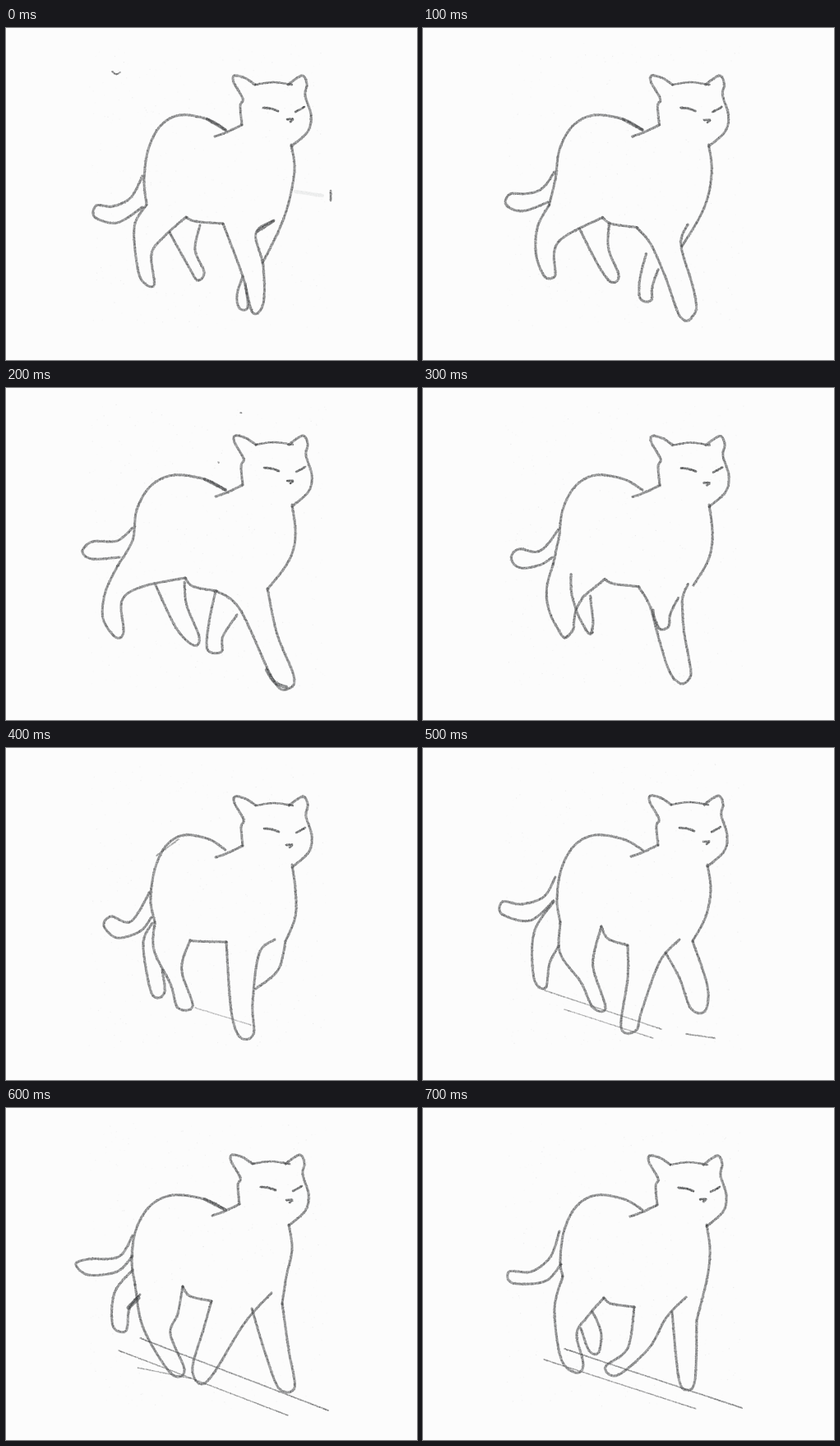
Recreate the animation shown at these times as an HTML page with a canvas. Size 500 by 404 pixels, loop 800 ms.

```html
<!DOCTYPE html>
<html lang="en">
<head>
<meta charset="utf-8">
<title>Walking cat</title>
<style>
html, body { margin: 0; width: 100%; height: 100%; overflow: hidden; background: #fcfcfc; }
canvas { display: block; width: 500px; height: 404px; }
</style>
</head>
<body>
<canvas id="stage" width="500" height="404"></canvas>
<script>
const W = 500, H = 404, STEP = 100;

// Parts that keep their shape and only shift with the pose
const head = {
  earL: "287,118 285,95 288,86 277,66 278,58 291,61 303,69",
  brow: "303,69 325,66 348,69",
  face: "343,69 360,58 366,68 364,82 371,106 367,126 347,144",
  neck: "254,132 268,127 287,118",
  eyeL: "313,97 322,98 331,101",
  eyeR: "352,102 358,99 363,96"
};
const spine = "267,124 245,111 212,106 188,119 173,148 168,185";
const ink = {
  brow: [2.8, 0.8], eyeL: [3.2, 1], eyeR: [3, 1], nose: [3, 1], ridge: [4.3, 0.8]
};

// Limbs run down the outer edge, round the paw and up the inner edge
const plant = {
  shift: [0, 0], rump: 0, nose: "346,112", ridge: 1,
  chest: "344,212 332,246 312,286",
  tail: "166,180 152,206 130,217 110,216 108,230 135,237 166,218",
  hind: "171,215 157,238 157,270 164,305 180,313 177,275 192,254 219,230",
  hind2: "199,249 222,290 233,307 241,297 230,270 236,240",
  fore: "326,234 304,250 313,290 313,335 300,346 288,302 264,238",
  fore2: "291,312 294,340 284,341 281,325 288,302",
  marks: ["4.5 .9|325,235 306,247", "2 .8|129,53 134,56 139,54", "3 .9|395,198 395,210", "5 .1|352,199 385,204"]
};
const reach = {
  shift: [1, 0], rump: -14, nose: "346,114", ridge: 1,
  chest: "350,195 340,217 318,245",
  tail: "154,170 135,186 105,187 93,199 105,208 138,206",
  hind: "136,216 121,248 118,280 133,303 143,297 141,259 165,242 218,231",
  hind2: "182,240 207,292 228,313 235,303 220,265 217,236",
  fore: "318,244 330,300 350,350 345,365 326,357 285,270 256,247",
  fore2: "281,276 264,302 262,321 245,318 247,285 255,247",
  marks: ["5 .85|317,343 327,358 341,364", "1.8 .8|285,30 286,30", "1.8 .7|258,90 259,91"]
};
const gather = {
  shift: [1, 1], rump: 8, nose: "345,119",
  chest: "352,205 340,235",
  tail: "175,175 152,211 128,205 119,216 135,231 163,223 177,206",
  hind: "181,212 180,246 200,287 209,316 227,314 215,277 215,258 224,234",
  hind2: "178,213 167,238 175,292 184,304 193,296 190,270",
  fore: "327,233 308,250 300,310 301,348 285,352 274,320 268,236",
  fore2: "340,235 331,270 304,293",
  marks: ["1.6 .3|230,316 298,337", "2 .5|183,131 210,111"]
};
const swing = {
  shift: [-1, 0], rump: -5, nose: "345,115",
  chest: "344,205 328,235",
  tail: "161,157 147,181 120,190 97,187 96,202 130,210 159,186",
  hind: "167,212 167,250 192,285 207,316 222,316 208,272 208,250 217,217",
  hind2: "159,187 135,225 135,280 149,292 154,262 165,241",
  fore: "312,233 288,260 266,320 259,344 241,340 249,280 249,240",
  fore2: "328,235 346,290 343,320 326,317 312,280 295,249",
  marks: ["1.6 .45|148,295 290,342", "1.4 .4|172,318 280,353", "2 .55|320,348 355,353"]
};
const land = {
  shift: [-3, -1], rump: -15, nose: "345,113", ridge: 1,
  chest: "341,205 336,238",
  tail: "154,155 137,181 100,184 85,190 100,203 135,199 154,180",
  hind: "157,215 165,262 186,303 205,326 217,318 200,275 209,250 215,217",
  hind2: "154,197 132,225 130,265 146,271 150,244 163,227",
  fore: "323,225 290,262 251,325 235,335 227,315 240,270 250,235",
  fore2: "336,238 344,295 351,340 332,341 315,297 299,244",
  marks: ["6 .85|149,243 161,231", "1.8 .6|163,280 392,368", "1.5 .55|137,295 343,374", "1.4 .45|160,316 225,329"]
};
const pass = {
  shift: [-2, 0], rump: -1, nose: "341,112",
  chest: "346,205 333,258",
  tail: "166,150 155,181 132,199 105,199 109,213 148,211 168,190",
  hind: "170,205 160,245 168,305 186,322 195,312 187,275 200,254 220,231",
  hind2: "192,268 202,295 213,298 217,278 213,262 206,248",
  fore: "320,230 296,255 275,292 237,325 222,315 249,292 257,242",
  fore2: "333,258 331,330 321,343 311,328 303,248",
  marks: ["1.8 .6|172,293 388,365", "1.5 .5|147,306 332,366"]
};

const parse = s => s.split(" ").map(p => p.split(",").map(Number));
const mix = (a, b, t) => [a[0] + (b[0] - a[0]) * t, a[1] + (b[1] - a[1]) * t];

// Catmull-Rom curve through the points, in steps of about 0.8 px
function smooth(pts) {
  const out = [], at = i => pts[Math.max(0, Math.min(pts.length - 1, i))];
  for (let i = 0; i < pts.length - 1; i++) {
    const [a, b, c, d] = [at(i - 1), at(i), at(i + 1), at(i + 2)];
    const n = Math.ceil(Math.hypot(c[0] - b[0], c[1] - b[1]) / 0.8);
    for (let k = 0; k < n; k++) {
      const t = k / n;
      out.push([0, 1].map(j => b[j] + 0.5 * t * (c[j] - a[j] +
        t * (2 * a[j] - 5 * b[j] + 4 * c[j] - d[j] +
        t * (3 * (b[j] - c[j]) + d[j] - a[j])))));
    }
  }
  return [...out, pts[pts.length - 1]];
}

function trace(pose) {
  const [dx, dy] = pose.shift, parts = {};
  for (const key in head) parts[key] = parse(head[key]).map(([x, y]) => [x + dx, y + dy]);
  for (const key of ["tail", "hind", "hind2", "fore", "fore2"]) parts[key] = parse(pose[key]);

  const back = parse(spine).map(([x, y]) => [x + pose.rump * Math.min(1, (267 - x) / 95), y]);
  parts.back = [...back, parts.hind[0]];
  if (pose.ridge) parts.ridge = back.slice(0, 2).reverse();
  parts.chest = [[347 + dx, 142], [351 + dx, 172], ...parse(pose.chest)];

  const a = parts.hind.at(-1), b = parts.fore.at(-1);
  parts.belly = [a, [mix(a, b, 0.25)[0], mix(a, b, 0.65)[1]], b];

  const [nx, ny] = parse(pose.nose)[0];
  parts.nose = [[nx - 4, ny - 1], [nx + 3, ny - 1], [nx, ny + 2]];

  const strokes = {};
  for (const key in parts) strokes[key] = smooth(parts[key]);
  return { strokes, marks: pose.marks };
}

// Halfway drawing between two poses
function between(p, q) {
  const a = trace(p).strokes, b = trace(q).strokes, strokes = {};
  for (const key in a) {
    if (!b[key]) continue;
    const n = Math.max(a[key].length, b[key].length) - 1;
    const pick = (c, i) => c[Math.round(i / n * (c.length - 1))];
    strokes[key] = Array.from({ length: n + 1 }, (_, i) => mix(pick(a[key], i), pick(b[key], i), 0.5));
  }
  return { strokes, marks: [] };
}

function seeded(seed) {
  return () => {
    seed = (seed * 16807) % 2147483647;
    return seed / 2147483647;
  };
}

function pencil(g, rnd, curve, width = 3.5, dark = 0.75) {
  g.lineCap = g.lineJoin = "round";
  g.lineWidth = width * 0.85;
  g.strokeStyle = `rgba(70,72,74,${dark * 0.68})`;
  g.beginPath();
  curve.forEach(([x, y]) => g.lineTo(x, y));
  g.stroke();

  // graphite grain
  for (const [x, y] of [...curve, ...curve]) {
    const a = rnd() * 2 * Math.PI, r = Math.sqrt(rnd()) * width * 0.52;
    const tone = rnd() < 0.66 ? 50 : 225;
    g.fillStyle = `rgba(${tone},${tone},${tone},${dark * (0.15 + 0.3 * rnd())})`;
    g.fillRect(x + r * Math.cos(a) - 0.5, y + r * Math.sin(a) - 0.5, 1.1, 1.1);
  }
}

function render({ strokes, marks }, i) {
  const c = document.createElement("canvas"), g = c.getContext("2d"), rnd = seeded(i * 9973 + 51);
  c.width = W;
  c.height = H;
  g.fillStyle = "#fcfcfc";
  g.fillRect(0, 0, W, H);
  for (let k = 0; k < 400; k++) {
    g.fillStyle = `rgba(120,120,124,${0.02 + 0.1 * rnd() ** 3})`;
    g.fillRect(100 + rnd() * 290, 18 + rnd() * 348, 1.2, 1.2);
  }
  for (const key in strokes) pencil(g, rnd, strokes[key], ...(ink[key] || []));
  for (const mark of marks) {
    const [style, pts] = mark.split("|");
    pencil(g, rnd, smooth(parse(pts)), ...style.split(" ").map(Number));
  }
  return c;
}

const sheets = [
  trace(plant), between(plant, reach), trace(reach), between(reach, gather),
  trace(gather), trace(swing), trace(land), trace(pass)
].map(render);
const stage = document.getElementById("stage").getContext("2d");
const start = performance.now();

function draw() {
  const i = Math.floor((performance.now() - start) / STEP) % sheets.length;
  stage.drawImage(sheets[i], 0, 0);
  requestAnimationFrame(draw);
}
draw();
</script>
</body>
</html>
```
